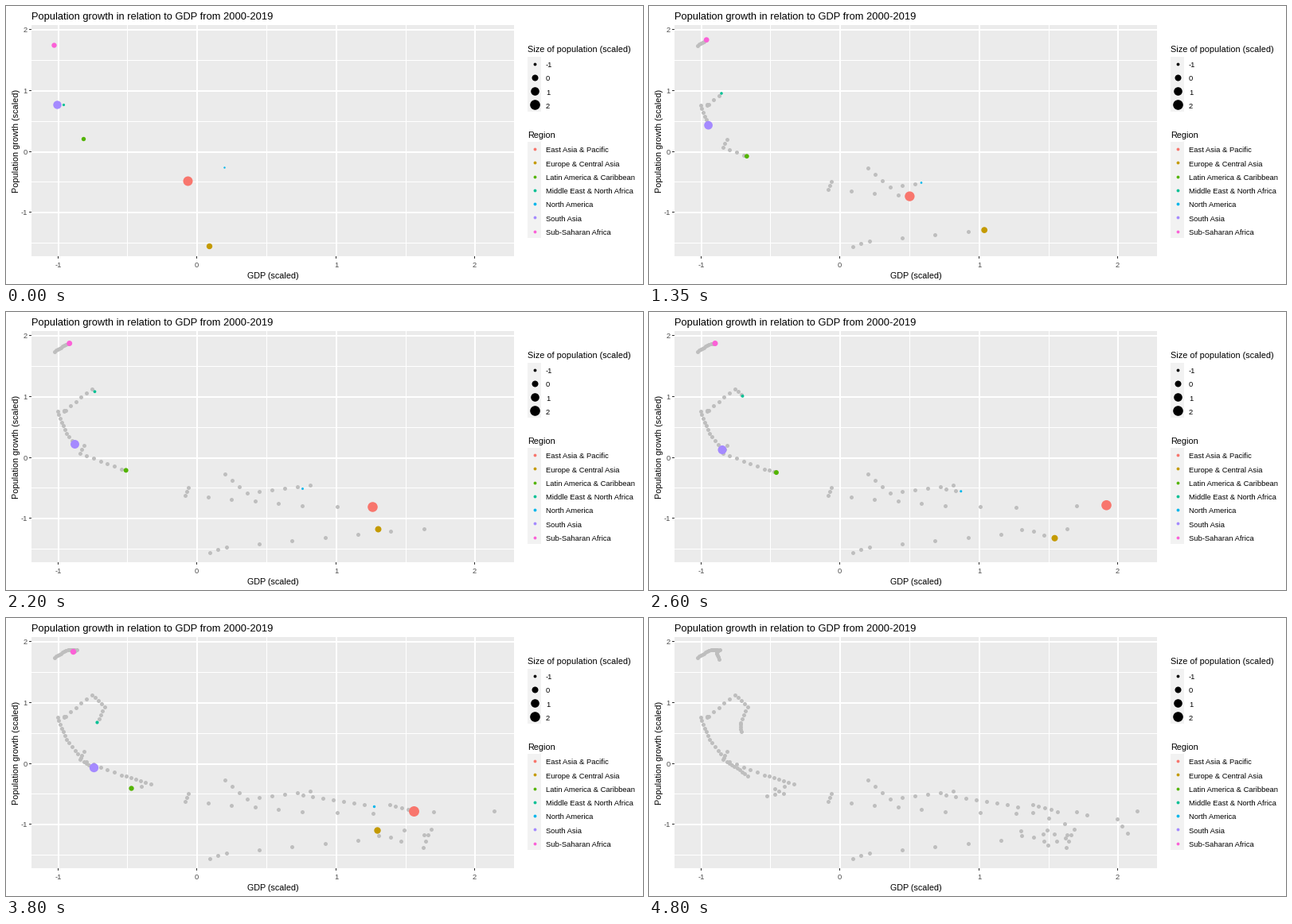
Write a matplotlib script that moves like this. It is 800 px wide and 350 px high and loops after 5000 ms.

```python
import numpy as np
import matplotlib.pyplot as plt
from matplotlib.animation import FuncAnimation
from matplotlib.patches import Rectangle

W, H, DPI = 800, 350, 100
FRAMES, INTERVAL = 100, 50
LEFT, TOP, RIGHT, BOTTOM = 32, 24, 638, 314.5
PX = 72 / DPI  # points per pixel
YEARS = 21
GROWTH = 0.6  # dot radius gained over the whole period

plt.rcParams["font.family"] = "Liberation Sans"

# name, colour, first dot radius, turning points as (year, x, y)
REGIONS = [
    ("East Asia & Pacific", "#F8766D", 6.0,
     [(0, 228, 220), (2, 224, 230), (7, 371, 243), (9, 460, 245), (11, 612, 242),
      (12, 481, 234), (16, 512, 243), (18, 587, 252), (20, 600, 270)]),
    ("Europe & Central Asia", "#C49A00", 3.7,
     [(0, 255, 302), (2, 276, 295), (8, 524, 272), (9, 467, 273), (11, 523, 288),
      (14, 533, 265), (16, 466, 267), (18, 522, 276), (20, 500, 285)]),
    ("Latin America & Caribbean", "#53B400", 2.7,
     [(0, 97, 167), (2, 92, 177), (8, 144, 197), (14, 181, 208),
      (16, 157, 214), (18, 168, 220), (20, 147, 223)]),
    ("Middle East & North Africa", "#00C094", 1.6,
     [(0, 72, 124), (3, 74, 123), (8, 107, 96), (12, 123, 111),
      (16, 114, 131), (20, 115, 142)]),
    ("North America", "#00B6EB", 1.2,
     [(0, 274, 203), (3, 302, 227), (8, 381, 217), (9, 372, 222),
      (16, 462, 237), (19, 521, 258), (20, 508, 271)]),
    ("South Asia", "#A58AFF", 5.2,
     [(0, 64, 124), (6, 75, 152), (12, 97, 180), (16, 110, 188), (20, 123, 198)]),
    ("Sub-Saharan Africa", "#FB61D7", 3.2,
     [(0, 60, 49), (8, 77, 39), (13, 88, 39), (16, 84, 42), (20, 87, 51)]),
]
COLORS = [r[1] for r in REGIONS]
RADII = np.array([r[2] for r in REGIONS])


def yearly(points):
    """Spread turning points over all years, centred on pixels."""
    t, x, y = np.transpose(points)
    years = np.arange(YEARS)
    return np.column_stack([np.interp(years, t, x), np.interp(years, t, y)]) + 0.5


PATHS = np.array([yearly(r[3]) for r in REGIONS])  # region, year, xy

# Each year rests for two frames; the later years pass faster
leave = np.cumsum([0] + [5] * 13 + [4] * 6 + [6])
arrive = np.maximum(leave - 1, 0)
arrive[-1] -= 1
KNOTS = np.column_stack([arrive, leave]).ravel()
KNOT_YEARS = np.repeat(np.arange(YEARS), 2)

fig = plt.figure(figsize=(W / DPI, H / DPI), dpi=DPI, facecolor="white")
ax = fig.add_axes([0, 0, 1, 1])
ax.set_xlim(0, W)
ax.set_ylim(H, 0)
ax.axis("off")


def rect(x, y, w, h, color, z=0):
    ax.add_patch(Rectangle((x, y), w, h, fc=color, ec="none", lw=0,
                           antialiased=False, zorder=z))


def label(x, y, s, size, color="black", **kw):
    ax.text(x, y, s, fontsize=size * PX, color=color, **kw)


def area(radius):
    return (2 * np.asarray(radius) * PX) ** 2


def dots(xy, radius, color, z):
    xy = np.reshape(xy, (-1, 2))
    return ax.scatter(xy[:, 0], xy[:, 1], s=area(radius), c=color,
                      linewidths=0, zorder=z)


def draw_panel():
    rect(LEFT, TOP, RIGHT - LEFT, BOTTOM - TOP, "#EBEBEB")
    # Even steps are wide major lines, odd steps thin minor lines
    for i in range(8):
        major = i % 2 == 0
        width = 2 if major else 1
        x = int(65.6 + 87.3 * i - major / 2)
        y = int(30.1 + 38.35 * i - major / 2)
        if x < RIGHT:
            rect(x, TOP, width, BOTTOM - TOP, "white", 1)
        rect(LEFT, y, RIGHT - LEFT, width, "white", 1)
        if major:
            rect(x, BOTTOM, 1, 3, "#333333", 1)
            rect(LEFT - 3, y, 3, 1, "#333333", 1)
            label(x + 0.5, 329.3, str(i // 2 - 1), 9.4, "#4D4D4D", ha="center")
            label(27, y + 4, str(2 - i // 2), 9.4, "#4D4D4D", ha="right")
    label(LEFT, 17, "Population growth in relation to GDP from 2000-2019", 12.9)
    label(335, 343, "GDP (scaled)", 10.8, ha="center")
    label(18, 170, "Population growth (scaled)", 10.9, rotation=90,
          ha="right", va="center")


def draw_legend(title, title_y, top, entries):
    step = 17.28
    label(655, title_y, title, 10.9)
    rect(655, top, 17.28, step * len(entries), "#F2F2F2")
    for i, (name, color, radius) in enumerate(entries):
        y = top + step * (i + 0.5)
        dots([663.5, y], radius, [color], 3)
        label(678, y + 4.4, name, 9.4)


draw_panel()
draw_legend("Size of population (scaled)", 58, 64,
            [(str(n), "black", r) for n, r in zip(range(-1, 3), (1.9, 4, 5.3, 6.3))])
draw_legend("Region", 166, 171.3, [(r[0], r[1], 1.9) for r in REGIONS])

trail = dots(np.empty((0, 2)), 2.5, "#BEBEBE", 4)
heads = dots(PATHS[:, 0], RADII, COLORS, 5)


def update(frame):
    year = np.interp(frame, KNOTS, KNOT_YEARS)
    k = min(int(year), YEARS - 2)
    part = year - k
    heads.set_offsets(PATHS[:, k] * (1 - part) + PATHS[:, k + 1] * part)
    heads.set_sizes(area(RADII + GROWTH * year / (YEARS - 1)))
    heads.set_visible(frame <= leave[-1])
    trail.set_offsets(PATHS[:, frame > leave].reshape(-1, 2))
    return trail, heads


anim = FuncAnimation(fig, update, frames=FRAMES, interval=INTERVAL,
                     init_func=lambda: update(0), repeat=True, repeat_delay=0)
plt.show()
```
